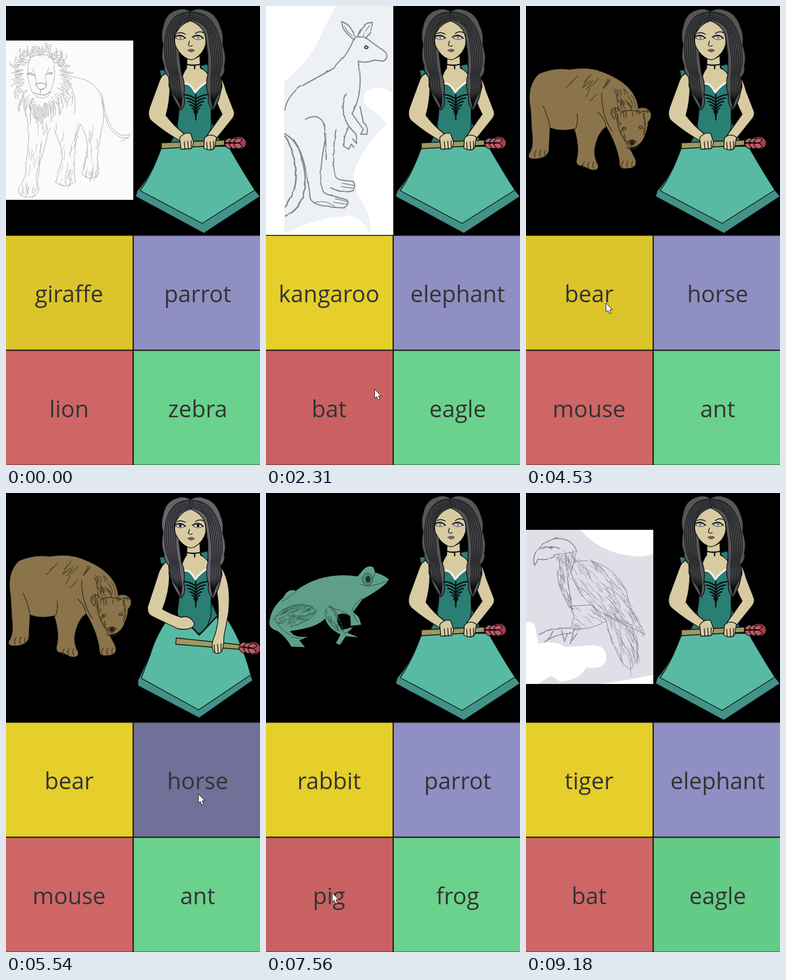
An HTML page that plays this animation: 443 by 798 pixels, repeating every 9.88 s.

```html
<!DOCTYPE html>
<html lang="en">
<head>
<meta charset="utf-8">
<title>Animal quiz</title>
<style>
  html, body { margin: 0; width: 100%; height: 100%; overflow: hidden; background: #000; }
  svg { display: block; width: 100vw; height: 100vh; }
  text { font: 40px "Open Sans", sans-serif; fill: #333; text-anchor: middle; }
  path { stroke-linecap: round; stroke-linejoin: round; }
  .ink { stroke: #0b0f0f; stroke-width: 1.3; }
  .line { fill: none; }
  .bold { fill: none; stroke-width: 2.3; }
  .skin { fill: #d8cba2; }
  .trim { fill: #43928a; }
  .skirt { fill: #58baa3; }
  .bodice { fill: #2a7e73; }
  .staff { fill: #a0985f; }
  .sketch { fill: none; }
</style>
</head>
<body>
<svg viewBox="0 0 443 798">
  <defs>
    <filter id="pencil" x="-5%" y="-5%" width="110%" height="110%">
      <feTurbulence baseFrequency=".06"/>
      <feDisplacementMap in="SourceGraphic" scale="2"/>
    </filter>
    <g id="hair" class="ink">
      <path fill="currentColor" d="M323 10Q310 2 298 7Q278 12 274 36Q269 50 274 68Q269 90 276 104Q274 114 284 124Q284 154 305 181Q315 172 310 155Q314 136 306 118L302 85V50L323 27Z"/>
    </g>
    <g id="head" class="ink">
      <use href="#hair"/>
      <use href="#hair" transform="matrix(-1 0 .13 1 643 0)"/>
      <path class="skin" d="M322 26Q305 31 297 46Q291 62 297 72Q305 87 317 92Q324 95 330 91Q343 84 348 68Q352 38 322 26Z"/>
      <path class="line" d="M298 48Q305 44 313 49M330 48Q338 42 345 47M320 61L318 68Q320 71 325 69"/>
      <path fill="#84605f" stroke="#413234" stroke-width=".8" d="M317 77Q323 73 329 77Q323 83 317 77Z"/>
      <path class="bold" d="M314 101Q326 105 340 101M329 104V109"/>
    </g>
    <g id="eye" class="ink">
      <path fill="#e3e3ee" stroke-width=".8" d="M-8 1Q0 -7 8 1Q0 6 -8 1Z"/>
      <circle r="2.4" fill="currentColor" stroke="none"/>
      <path class="line" stroke-width="1.8" d="M-10 -1Q0 -8 9 1"/>
    </g>
    <g id="bust" class="ink">
      <path class="bodice" d="M268 111L284 112L303 139Q318 130 331 150Q340 136 356 127L338 104L350 101Q364 114 364 140Q356 180 358 198Q360 220 343 244H325Q298 224 299 204Q304 180 300 160L280 126L270 122Z"/>
      <path class="skin" d="M316 89L315 108Q307 118 304 138Q316 126 331 151Q340 136 357 128Q352 114 339 108L338 86Q328 95 316 89Z"/>
      <path class="bold" stroke-width="6" d="M305 139Q318 129 330 151Q340 138 357 129"/>
      <path class="line" style="stroke:#f2f2ed;stroke-width:3.5" d="M305 138Q318 128 330 150Q340 137 357 128"/>
      <path id="lacing" class="bold"/>
    </g>
    <g id="rose" class="ink" fill="#bd5a66">
      <ellipse cx="26" rx="13" ry="11" fill="#a43c50"/>
    </g>
    <path id="fingers" class="ink line" d="M0 0l1 13m5-14l1 14m5-15l0 13"/>
    <path id="toes" class="line" d="M0 0q-5 5 -2 11m10-11q-4 5 -1 11m9-11q-3 5 0 11"/>
  </defs>

  <g id="idle" class="ink" color="#565557">
    <path class="trim" d="M272 244Q254 294 229 321L226 331L345 395L443 331L434 320Q413 288 388 244Z"/>
    <path class="skirt" d="M272 244Q254 294 234 321L342 378L434 320Q413 288 388 244Z"/>
    <path class="bodice" d="M299 200Q296 225 285 240H376L358 200Z"/>
    <use href="#bust"/>
    <path class="skin" d="M283 116Q271 118 267 132L250 178Q246 193 254 200Q275 218 303 234L313 224Q292 208 279 190Q290 150 283 116Z"/>
    <path class="skin" d="M368 116Q379 127 384 148L398 184Q399 192 393 198L364 234L350 226L377 188Q356 150 368 116Z"/>
    <path class="staff" d="M271 238L381 233V242L271 248Z"/>
    <path class="skin" d="M303 229Q312 218 322 222L327 236Q326 248 322 248L305 249Z"/>
    <path class="skin" d="M346 230Q355 220 367 228L364 246Q358 254 345 247Z"/>
    <use href="#fingers" x="311" y="236"/>
    <use href="#fingers" x="350" y="237"/>
    <use href="#rose" transform="translate(380 238)"/>
    <use href="#head"/>
    <g color="#858795"><use href="#eye" x="304" y="55"/><use href="#eye" x="335" y="55"/></g>
  </g>

  <g id="reply" class="ink" color="#67636c">
    <path class="trim" d="M287 212Q262 245 252 280L230 326V335L337 391L430 326L427 316Q410 255 386 220Z"/>
    <path class="skirt" d="M287 212Q262 245 252 280L236 322L336 377L427 316Q410 255 386 220Z"/>
    <path class="bodice" d="M302 195V214Q322 228 337 247Q354 228 369 214L358 190Z"/>
    <use href="#bust"/>
    <path class="skirt" stroke="none" d="M303 217Q322 230 337 249Q352 232 368 216V256H300Z"/>
    <path class="bold" d="M303 215Q322 230 337 247Q352 232 367 215"/>
    <path class="staff" d="M297 252L410 264V272L296 263Z"/>
    <path class="skin" d="M283 118Q270 124 264 146L247 198Q246 210 254 214L300 236Q324 240 329 228Q322 212 306 216Q290 212 273 202Q290 160 283 118Z"/>
    <path class="skin" d="M366 118Q395 145 388 208L380 250Q380 268 376 276Q368 282 362 276Q356 264 364 248Q378 205 362 145Z"/>
    <use href="#fingers" x="363" y="264"/>
    <use href="#rose" transform="rotate(7 407 268) translate(405 267)"/>
    <g transform="translate(0 2)">
      <use href="#head"/>
      <g color="#111"><use href="#eye" x="304" y="55"/><use href="#eye" x="335" y="55"/></g>
    </g>
  </g>

  <g id="lion" class="animal">
    <rect y="60" width="222" height="277" fill="#fbfbfc"/>
    <g class="sketch" stroke="#b2adaa" filter="url(#pencil)">
      <ellipse cx="34" cy="88" rx="8" ry="10"/><ellipse cx="88" cy="88" rx="9" ry="10"/>
      <path d="M42 89Q60 78 79 88Q89 104 79 144Q74 159 61 160Q48 159 43 145Q31 105 42 89"/>
      <path d="M108 122Q147 123 162 149Q176 181 165 217M166 163Q176 234 213 229M166 150Q178 236 215 222Q214 232 200 234"/>
      <path data-fur="24 95 20" d="M34 185Q43 224 35 265Q36 298 22 314Q18 332 38 331Q64 330 54 310Q55 275 76 212"/>
      <path data-fur="20 105 18" d="M83 213Q98 245 97 264L86 306Q104 319 120 305Q113 275 128 205"/>
      <path data-fur="20 95 18" d="M129 204Q143 229 141 250L132 292Q148 306 162 292Q155 270 165 217M107 130Q126 160 118 188"/>
      <path stroke="#77777a" d="M37 118Q43 113 49 120ZM69 119Q74 112 80 116ZM51 135Q60 130 70 136Q60 155 51 135ZM60 146V151M47 149Q60 160 76 149"/>
      <path d="M45 108Q53 122 51 136M74 106Q66 121 70 136"/>
      <use href="#toes" x="31" y="314"/><use href="#toes" x="97" y="300"/><use href="#toes" x="142" y="287"/>
    </g>
  </g>

  <g id="kangaroo" class="animal">
    <rect width="222" height="398" fill="#fff"/>
    <path fill="#edf0f5" d="M122 0H222V151Q190 132 172 152Q165 172 188 182L211 204Q163 250 152 294L160 330Q186 364 181 398Q166 358 130 366Q80 371 32 396V131Q81 94 101 39Z"/>
    <g class="sketch" stroke="#85878b" stroke-width="2" filter="url(#pencil)">
      <path d="M153 58Q132 43 131 26Q148 32 154 52M160 52Q167 31 184 27Q186 43 174 56M152 57Q165 47 182 61L207 79Q214 88 204 95L188 93Q173 99 160 95"/>
      <path d="M151 59Q140 87 116 108L58 140Q35 157 32 180M160 95Q170 150 149 186M139 152Q124 185 150 216Q159 220 157 238L150 230M144 210Q134 223 135 243L143 248L148 239L153 246M149 186L169 214L164 222H175Q178 206 169 202L163 174"/>
      <path d="M68 196Q90 183 101 205Q104 234 104 266M47 231Q69 260 76 333Q80 349 137 350Q147 344 140 336L104 326Q85 316 104 222M122 214Q110 298 127 301L151 304Q158 312 151 320Q133 326 112 315"/>
      <path stroke-width="2.6" d="M33 222Q55 235 61 262Q75 312 60 340Q49 358 33 364M33 226Q46 246 50 275Q57 315 33 348"/>
      <path stroke-width="1.4" d="M120 334l21 5M117 340l24 4M132 307l20 4M130 313l22 3M137 34Q140 45 150 51M180 33Q171 42 169 53M83 341Q104 335 119 348"/>
      <ellipse cx="174" cy="71" rx="3" ry="2" stroke="#444"/>
    </g>
  </g>

  <g id="bear" class="animal ink" stroke-width="1">
    <path fill="#8b744b" d="M8 180Q0 139 22 118Q48 106 76 110Q110 105 132 114Q192 136 196 178Q212 173 218 186Q220 195 213 202Q213 213 207 226Q201 245 181 247L190 264Q198 283 174 283Q162 284 163 273Q160 245 140 210Q127 219 122 239Q116 258 126 277Q128 287 113 285L98 278Q86 279 88 267Q94 245 84 214Q61 219 42 212L40 252Q36 266 13 266Q2 266 5 257Q14 245 10 218Z"/>
    <g class="sketch" stroke="#3a2d1b">
      <path data-fur="28 70 11" stroke="none" d="M154 145L184 148L193 180H160Z"/>
      <path data-fur="34 95 7" d="M154 196Q144 186 151 179Q159 174 167 185Q181 178 200 185Q204 181 215 184M160 188Q154 210 181 247M204 187Q212 204 205 224"/>
      <path data-fur="12 125 18" stroke="none" d="M78 115L148 130L125 162L68 155Z"/>
      <path d="M132 151Q131 188 150 218M125 184Q137 194 140 210M89 188Q92 206 84 217M30 174Q39 194 42 212M177 236Q186 230 193 236L184 244ZM175 246Q184 253 196 243"/>
      <ellipse cx="171" cy="213" rx="3" ry="2"/><ellipse cx="200" cy="211" rx="3" ry="2"/><circle cx="185" cy="237" r="4" fill="#292016"/>
      <use href="#toes" x="18" y="251"/><use href="#toes" x="102" y="271"/><use href="#toes" x="170" y="270"/>
    </g>
  </g>

  <g id="frog" class="animal">
    <path fill="#609f87" d="M6 225Q8 200 30 182Q38 165 52 170Q98 136 160 145L170 133Q180 124 188 130L190 138Q205 142 214 150Q212 160 168 185L152 207L162 216L166 229L148 231L147 214Q135 206 125 212Q122 228 133 238L152 233L142 243L161 251L139 249L129 264L122 261L130 246Q108 235 103 218Q90 234 42 240Q48 252 73 250L58 256L68 268L44 267Q35 250 20 240Q5 235 6 225Z"/>
    <g class="sketch" stroke="#294e43">
      <path data-fur="75 155 11" d="M12 222Q26 197 59 194Q83 194 87 207Q79 222 42 233"/>
      <path data-fur="30 65 9" d="M136 242Q122 196 111 197Q100 203 104 215L122 238"/>
      <path d="M28 189Q48 176 53 170M16 219Q22 237 42 247M111 199Q130 203 143 211M150 205Q155 190 168 183M165 159Q181 166 211 153M190 139Q188 151 175 160M43 250l18 3M137 244l12-6M152 211l8 13"/>
      <ellipse cx="177" cy="150" rx="9" ry="11" fill="#4f8b75"/><ellipse cx="178" cy="150" rx="4" ry="6" fill="#1d332d"/>
    </g>
  </g>

  <g id="eagle" class="animal">
    <rect y="64" width="222" height="268" fill="#dfdfe8"/>
    <path fill="#fff" d="M95 64Q130 105 190 110Q210 112 222 105V64ZM0 225Q18 220 18 245L22 262Q50 255 70 268L110 265Q142 262 140 290Q135 308 105 303Q95 325 60 328L44 318L20 332H0ZM222 316Q180 325 130 332H222Z"/>
    <g class="sketch" stroke="#85858d" filter="url(#pencil)">
      <path stroke-width="1.6" d="M20 98Q34 81 52 78Q80 78 88 101M42 94Q26 92 16 102Q10 113 14 125L20 115Q32 117 48 110M41 93Q51 92 58 96"/>
      <path data-fur="80 75 11" d="M48 108Q64 119 54 139Q57 174 80 204L72 150Q82 125 88 101Z"/>
      <path data-fur="110 52 20" d="M84 118Q123 112 150 137Q175 157 180 196L207 245L163 224Q136 213 113 194Q83 167 78 135Z"/>
      <path data-fur="26 35 12" d="M75 196Q90 211 76 235Q105 240 140 222L113 194Z"/>
      <path data-fur="35 72 30" d="M137 211Q145 259 169 297L181 306L193 291Q200 265 184 229Z"/>
      <path stroke-width="1.5" d="M75 234Q45 233 22 245M79 243Q54 242 31 258M48 240L36 255M61 238L66 257L71 244M84 236L76 261L88 243"/>
      <circle cx="43" cy="94" r="2" stroke="#494a50"/>
    </g>
  </g>

  <g id="buttons"></g>
  <path id="cursor" fill="#fff" stroke="#222" d="M.5.5V16L4 13L6.5 19L9.5 18L7 12H11.5Z"/>
</svg>
<script>
const LOOP = 9880;
const $ = id => document.getElementById(id);
const add = (parent, tag, attrs) => {
  const el = document.createElementNS("http://www.w3.org/2000/svg", tag);
  for (const name in attrs) el.setAttribute(name, attrs[name]);
  return parent.appendChild(el);
};
const repeat = (count, part) => Array.from({ length: count }, (_, i) => part(i / count, i)).join("");

let seed = 7;
const random = () => (seed = seed * 16807 % 2147483647) / 2147483647;

// Scatters short strokes inside a shape: "count angle length".
function drawFur(shape) {
  const [count, degrees, length] = shape.dataset.fur.split(" ").map(Number);
  const { x, y, width, height } = shape.getBBox();
  const d = repeat(count, () => {
    const point = shape.ownerSVGElement.createSVGPoint();
    do {
      point.x = x + width * random();
      point.y = y + height * random();
    } while (!shape.isPointInFill(point));
    const angle = (degrees + random() * 30 - 15) * Math.PI / 180;
    const dx = Math.cos(angle) * length / 2, dy = Math.sin(angle) * length / 2;
    return `M${point.x - dx} ${point.y - dy}q${dx + 2} ${dy} ${dx * 2} ${dy * 2}`;
  });
  add(shape.parentNode, "path", { d, "stroke-opacity": .7 });
}

function drawMane() {
  const d = repeat(130, k => {
    const c = Math.cos(k * 2 * Math.PI), s = Math.sin(k * 2 * Math.PI);
    const inner = 1 + random() * .35, outer = inner + .2 + random() * .2;
    const reach = s > 0 ? 52 : 35;
    return `M${61 + 31 * inner * c} ${118 + reach * .85 * inner * s}`
      + `Q${61 + 37 * outer * c} ${121 + reach * inner * s} ${61 + 33 * outer * c} ${120 + reach * outer * s}`;
  });
  add($("lion").querySelector(".sketch"), "path", { d });
}

function drawStrands() {
  const d = repeat(7, k => `M321 ${11 + 15 * k}C${288 + 8 * k} ${10 + 26 * k} ${275 + 24 * k} 40 ${277 + 22 * k} 80`
    + `S${290 + 14 * k} 110 ${285 + 20 * k} 130S${298 + 14 * k} 150 305 177`);
  add($("hair"), "path", { d, class: "line" });
}

function drawLacing() {
  const d = repeat(6, (k, i) => [-1, 1].map(side =>
    `M331 ${162 + 6 * i}q${side * 8 * (1 - k)} -7 ${side * 20 * (1 - k)} -8`).join(""));
  $("lacing").setAttribute("d", "M331 154V198" + d);
}

function drawPetals() {
  for (let i = 0; i < 6; i++) {
    const x = 8 + (i >> 1) * 8, y = i % 2 ? 6 : -5;
    add($("rose"), "path", { d: `M${x - 7} ${y / 3}Q${x} ${y * 2.6} ${x + 8} ${y}Q${x + 3} ${-y / 2} ${x - 7} ${y / 3}Z` });
  }
}

drawMane();
drawStrands();
drawLacing();
drawPetals();
document.querySelectorAll("[data-fur]").forEach(drawFur);

const palette = [ // normal, hovered, pressed
  ["#e6ce2b", "#dcc52a", "#b4a122"],
  ["#8f8fc3", "#8989bb", "#707099"],
  ["#cf6666", "#c96162", "#a25050"],
  ["#6ad28c", "#63cb86", "#53a56f"]
];
const buttons = palette.map((_, i) => {
  const column = i % 2, row = i >> 1, group = $("buttons");
  const x = column * 222.8, y = 399.5 + row * 200;
  add(group, "rect", { x: x - 2, y: y - 1.5, width: 225, height: 200.5, fill: "#10100c" });
  return {
    box: add(group, "rect", { x, y, width: 221.2, height: 198 }),
    label: add(group, "text", { x: 110 + column * 224.3, y: 514.5 + row * 200.5 })
  };
});

const rounds = [
  { start: 0, animal: "lion", words: "giraffe parrot lion zebra", click: 1210 },
  { start: 2310, animal: "kangaroo", words: "kangaroo elephant bat eagle", click: 3330 },
  { start: 4530, animal: "bear", words: "bear horse mouse ant", click: 5440 },
  { start: 6540, animal: "frog", words: "rabbit parrot pig frog", click: 8160 },
  { start: 9180, animal: "eagle", words: "tiger elephant bat eagle", click: Infinity }
];
const moves = [
  { from: 390, to: 1290, x: 189, y: 666 },
  { from: 2310, to: 2900, x: 139, y: 516 },
  { from: 5040, to: 5430, x: 335, y: 523 },
  { from: 6540, to: 7450, x: 115, y: 695 },
  { from: 7560, to: 7850, x: 299, y: 705 },
  { from: 8260, to: 9080, x: 365, y: 799 }
];
const ease = k => k * k * (3 - 2 * k);
const show = (el, visible) => el.style.display = visible ? "" : "none";

function cursorAt(t) {
  let x = 354, y = 790;
  for (const move of moves) {
    const k = ease(Math.min(1, Math.max(0, (t - move.from) / (move.to - move.from))));
    x += (move.x - x) * k;
    y += (move.y - y) * k;
  }
  return [x, y];
}

function draw(now) {
  const t = now % LOOP;
  const { animal, words, click } = rounds.findLast(round => round.start <= t);
  document.querySelectorAll(".animal").forEach(el => show(el, el.id === animal));

  const replying = t >= click + 100;
  const pressed = t >= click && t < click + 200;
  show($("idle"), !replying);
  show($("reply"), replying);

  const [x, y] = cursorAt(Math.floor((t + 10) / 100) * 100 - 10);
  show($("cursor"), t >= 190 && t < 9080);
  $("cursor").setAttribute("transform", `translate(${x} ${y})`);

  const hovered = t < 390 ? 0 : (x > 222) + (y > 598) * 2;
  const labels = words.split(" ");
  buttons.forEach(({ box, label }, i) => {
    const state = i !== hovered ? 0 : pressed ? 2 : 1;
    box.setAttribute("fill", palette[i][state]);
    if (label.textContent !== labels[i]) label.textContent = labels[i];
  });
  requestAnimationFrame(draw);
}
requestAnimationFrame(draw);
</script>
</body>
</html>
```
